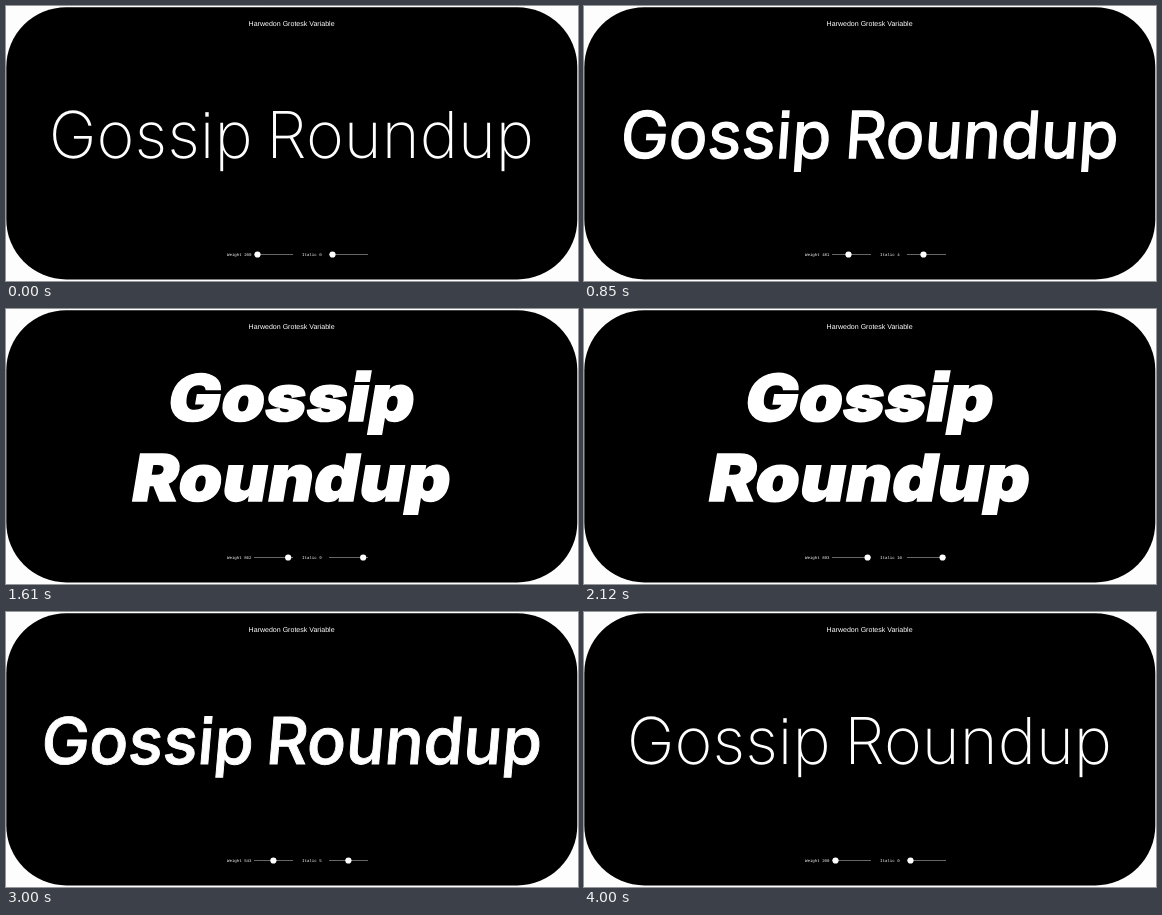
These frames come from a looping animation (572 by 275 pixels, 4030 ms). An HTML page:

```html
<!DOCTYPE html>
<html lang="en">
<head>
<meta charset="utf-8">
<title>Variable type specimen</title>
<style>
  html, body { margin: 0; width: 100%; height: 100%; overflow: hidden; background: #fdfdfd; }
  svg { display: block; width: 572px; height: 275px; }
  text { fill: #fff; text-rendering: geometricPrecision; white-space: pre; }
  .word {
    font-family: Inter, "Liberation Sans", sans-serif;
    font-size: 64.6px;
    font-optical-sizing: none;
    font-feature-settings: "ss07"; /* square dots */
    word-spacing: -4.6px;
    text-anchor: middle;
    stroke: #fff;
    stroke-linejoin: miter;
  }
  .title { font: 7.05px "Liberation Sans", Arial, sans-serif; text-anchor: middle; }
  .label { font: 4.08px "Liberation Mono", "DejaVu Sans Mono", monospace; }
  .rail { stroke: #939393; stroke-width: .7; }
  .knob { fill: #fff; }
</style>
</head>
<body>
<svg viewBox="0 0 572 275">
  <rect x=".3" y="1.2" width="571" height="272.2" rx="60"/>
  <text class="title" x="285.6" y="19.5">Harwedon Grotesk Variable</text>
  <text class="word" y="16"></text>
  <text class="word" y="16"></text>
  <text class="label" id="weight" x="221" y="249.8"></text>
  <path class="rail" d="M248 248.5H287M323 248.5H362"/>
  <circle class="knob" cy="248.5" r="3.1"/>
  <text class="label" id="italic" x="296" y="249.8"></text>
  <circle class="knob" cy="248.5" r="3.1"/>
</svg>
<script>
const LOOP = 4030, RISE_END = 1925, FALL_START = 1975, FALL_END = 4005;
const WRAP_AT = 0.545;
const SIZE = 64.6;
const words = document.querySelectorAll(".word");
const knobs = document.querySelectorAll(".knob");
const weightLabel = document.getElementById("weight");
const italicLabel = document.getElementById("italic");

const clamp = (v, lo, hi) => Math.min(hi, Math.max(lo, v));

// cubic-bezier(.42, 0, .58, 1)
function easeInOut(x) {
  let lo = 0, hi = 1;
  for (let i = 0; i < 24; i++) {
    const t = (lo + hi) / 2, u = 1 - t;
    if (1.26 * u * u * t + 1.74 * u * t * t + t * t * t < x) lo = t;
    else hi = t;
  }
  return lo * lo * (3 - 2 * lo);
}

function progress(ms) {
  return ms < FALL_START
    ? easeInOut(clamp(ms / RISE_END, 0, 1))
    : 1 - easeInOut(clamp((ms - FALL_START) / (FALL_END - FALL_START), 0, 1));
}

const pen = document.createElement("canvas").getContext("2d");
function measure(weight, text) {
  pen.font = `${weight} ${SIZE}px Inter, "Liberation Sans", sans-serif`;
  return pen.measureText(text).width;
}

// Without a weight axis, step in hundreds and fill the gap with stroke and tracking.
const sample = [300, 350, 400].map(w => measure(w, "Gossip Roundup"));
const hasAxis = Math.abs(sample[1] - sample[0]) > 0.1 && Math.abs(sample[1] - sample[2]) > 0.1;

function fitWeight(weight, text) {
  if (hasAxis) return { weight, stroke: 0, track: 0 };
  const base = Math.min(900, Math.floor(weight / 100) * 100);
  const rest = (weight - base) / 100;
  const grow = rest ? measure(base + 100, text) - measure(base, text) : 0;
  return { weight: base, stroke: rest * SIZE * 0.0225, track: grow * rest / text.length };
}

function setLine(el, text, baseline, p) {
  el.style.display = text ? "" : "none";
  if (!text) return;
  const heavy = clamp((p - 0.5) / 0.5, 0, 1);
  const fit = fitWeight(200 + 700 * Math.min(1, p * 1.06), text);
  const track = p < 0.5 ? 0.05 - 0.8 * p : Math.min(0.4, -0.35 + 5 * (p - 0.5));
  if (el.textContent !== text) el.textContent = text;
  el.style.fontWeight = fit.weight;
  el.style.letterSpacing = track + fit.track + "px";
  el.style.strokeWidth = fit.stroke + 1.6 * heavy + "px";
  el.setAttribute("transform",
    `translate(285.4 ${baseline - 16}) skewX(${-10 * p}) scale(${1 + 0.09 * heavy} 1)`);
}

function draw(ms) {
  const p = progress(ms);
  const wrapped = p > WRAP_AT;
  setLine(words[0], wrapped ? "Gossip" : "Gossip Roundup", wrapped ? 112 : 152, p);
  setLine(words[1], wrapped ? "Roundup" : "", 192, p);
  weightLabel.textContent = "Weight " + Math.round(200 + 700 * p);
  italicLabel.textContent = "Italic " + Math.round(10 * p);
  knobs[0].setAttribute("cx", 251.5 + 32.4 * p);
  knobs[1].setAttribute("cx", 326.5 + 32.4 * p);
}

const start = performance.now();
function tick() {
  draw((performance.now() - start) % LOOP);
  requestAnimationFrame(tick);
}
tick();
</script>
</body>
</html>
```
